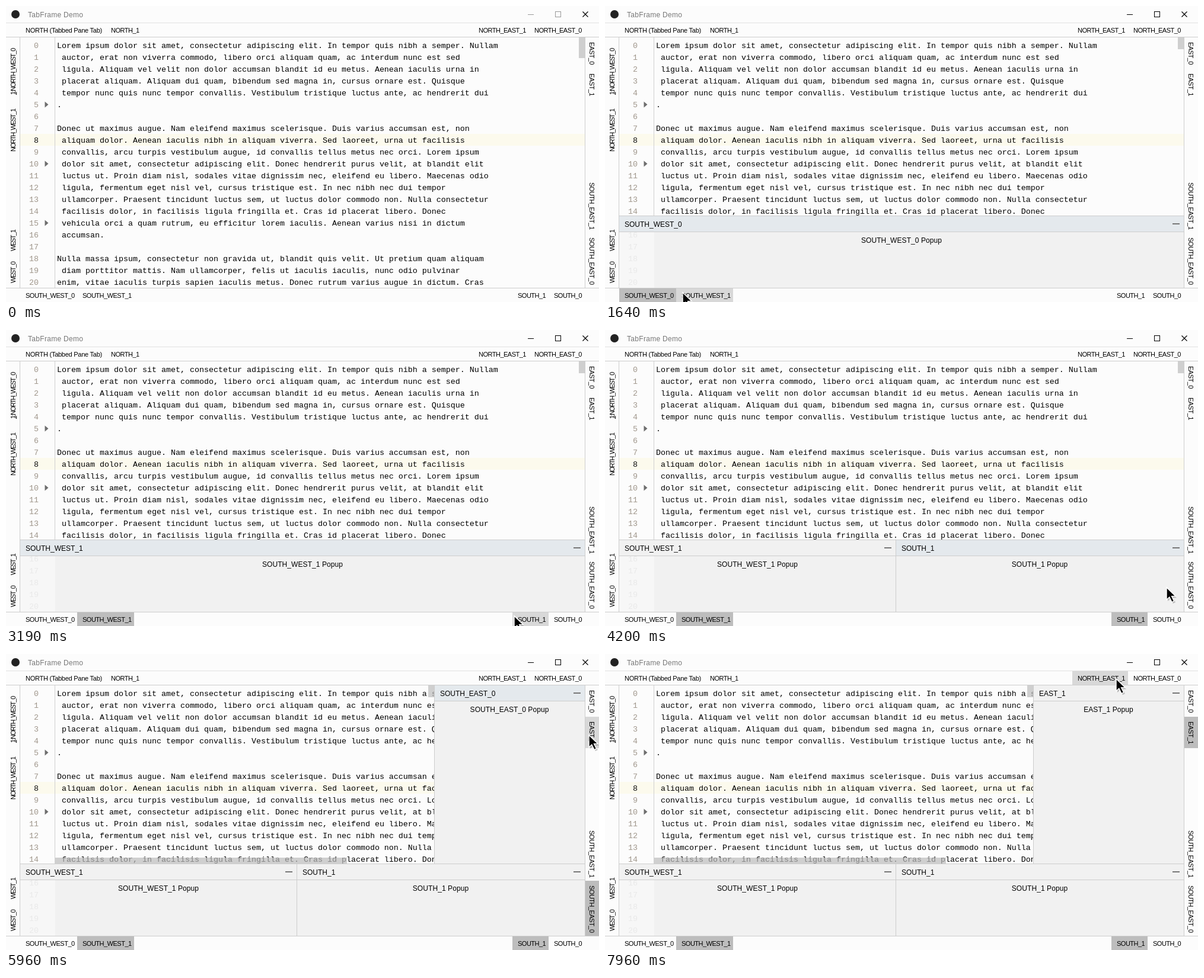
These frames come from a looping animation (1000x500 px, 7.99 s). An HTML page:

```html
<!DOCTYPE html>
<html lang="en">
<head>
<meta charset="utf-8">
<title>TabFrame Demo</title>
<style>
  html, body { margin: 0; width: 100%; height: 100%; overflow: hidden; background: #fcfcfc; }
  svg { display: block; width: 100vw; height: 100vh; }
  text { white-space: pre; font-family: "Liberation Sans", Arial, sans-serif; font-size: 12px; fill: #000; }
  .code { font-family: "Liberation Mono", "Courier New", monospace; font-size: 13.333px; }
  .num { fill: #a0978c; text-anchor: end; }
  .now { fill: #111; }
  .ghost { fill: #e9e9e9; }
  .tab { font-size: 11px; letter-spacing: -.5px; }
  .wide { letter-spacing: -.25px; }
  .tight { letter-spacing: -1.45px; }
  .title { fill: #777; letter-spacing: .3px; }
  .mid { text-anchor: middle; letter-spacing: .08px; }
</style>
</head>
<body>
<svg viewBox="0 0 1000 500" xmlns="http://www.w3.org/2000/svg">
  <g id="editor"></g>
  <g id="panels"></g>
  <g id="frame"></g>
  <g id="tabs"></g>
  <g id="cursor">
    <path d="M2 3V23l4.8-4 4.2 8 4-2-4-7.5h6z" fill="#000" opacity=".22"/>
    <path d="M0 0V20.5l4.8-4.3 4.1 8.4 3.7-1.7-4-8.3h6.4z" fill="#000" stroke="#fff" stroke-width="1.4"/>
  </g>
</svg>
<script>
const LOOP = 7990, STEP = 30;
const LINE = '#cdcdcd', HOVER = '#d8d8d8', SELECTED = '#bdbdbd';
const $ = id => document.getElementById(id);
const rect = (x, y, w, h, fill, more = '') =>
  `<rect x="${x}" y="${y}" width="${w}" height="${h}" fill="${fill}" ${more}/>`;
const text = (x, y, s, cls = '', more = '') =>
  `<text x="${x}" y="${y}" class="${cls}" ${more}>${s}</text>`;

const prose = [
  'Lorem ipsum dolor sit amet, consectetur adipiscing elit. In tempor quis nibh a semper. Nullam',
  ' auctor, erat non viverra commodo, libero orci aliquam quam, ac interdum nunc est sed',
  ' ligula. Aliquam vel velit non dolor accumsan blandit id eu metus. Aenean iaculis urna in',
  ' placerat aliquam. Aliquam dui quam, bibendum sed magna in, cursus ornare est. Quisque',
  ' tempor nunc quis nunc tempor convallis. Vestibulum tristique luctus ante, ac hendrerit dui',
  '.',
  '',
  'Donec ut maximus augue. Nam eleifend maximus scelerisque. Duis varius accumsan est, non',
  ' aliquam dolor. Aenean iaculis nibh in aliquam viverra. Sed laoreet, urna ut facilisis',
  ' convallis, arcu turpis vestibulum augue, id convallis tellus metus nec orci. Lorem ipsum',
  ' dolor sit amet, consectetur adipiscing elit. Donec hendrerit purus velit, at blandit elit',
  ' luctus ut. Proin diam nisl, sodales vitae dignissim nec, eleifend eu libero. Maecenas odio',
  ' ligula, fermentum eget nisl vel, cursus tristique est. In nec nibh nec dui tempor',
  ' ullamcorper. Praesent tincidunt luctus sem, ut luctus dolor commodo non. Nulla consectetur',
  ' facilisis dolor, in facilisis ligula fringilla et. Cras id placerat libero. Donec',
  ' vehicula orci a quam rutrum, eu efficitur lorem iaculis. Aenean varius nisi in dictum',
  ' accumsan.',
  '',
  'Nulla massa ipsum, consectetur non gravida ut, blandit quis velit. Ut pretium quam aliquam',
  ' diam porttitor mattis. Nam ullamcorper, felis ut iaculis iaculis, nunc odio pulvinar',
  'enim, vitae iaculis turpis sapien iaculis metus. Donec rutrum varius augue in dictum. Cras'
];
const lineNumber = (i, cls) => text(55, 71 + 20 * i, i, 'code num ' + cls);

$('editor').innerHTML = rect(24, 53, 952, 423, '#fcfcfc') + rect(24, 216, 952, 20, '#fcfaed') +
  rect(82, 53, 1, 423, '#d0d0d0') +
  prose.map((s, i) => lineNumber(i, i === 8 ? 'now' : '') + text(86, 71 + 20 * i, s, 'code')).join('') +
  [5, 10, 15].map(i => `<path d="M65.5 ${61.5 + 20 * i}l6 5-6 5z" fill="#6e6e6e"/>`).join('');

// name, x, y, w, h, text offset, side, style
const tabs = [
  ['NORTH (Tabbed Pane Tab)', 24, 29, 144, 23, 9, 0, 'wide'],
  ['NORTH_1', 168, 29, 65, 23, 9, 0],
  ['NORTH_EAST_1', 788, 29, 94, 23, 9, 0],
  ['NORTH_EAST_0', 882, 29, 94, 23, 9, 0],
  ['SOUTH_WEST_0', 24, 477, 96, 23, 9, 0],
  ['SOUTH_WEST_1', 120, 477, 96, 23, 9, 0],
  ['SOUTH_1', 854, 477, 61, 23, 9, 0],
  ['SOUTH_0', 915, 477, 61, 23, 9, 0],
  ['EAST_0', 977, 53, 23, 53, 8, 90],
  ['EAST_1', 977, 106, 23, 53, 8, 90],
  ['SOUTH_EAST_1', 977, 290, 23, 93, 8, 90],
  ['SOUTH_EAST_0', 977, 383, 23, 93, 8, 90],
  ['<tspan text-decoration="underline">1</tspan>:NORTH_WEST_0', 0, 62, 23, 97, 9, -90, 'tight'],
  ['NORTH_WEST_1', 0, 167, 23, 88, 9, -90, 'tight'],
  ['WEST_1', 0, 370, 23, 53, 9, -90, 'tight'],
  ['WEST_0', 0, 423, 23, 54, 9, -90, 'tight']
];

function drawTab([name, x, y, w, h, pad, side, style = ''], fill) {
  const [tx, ty] = side === 0 ? [x + pad, y + 16]
    : side > 0 ? [x + 7, y + pad] : [x + 16, y + h - pad];
  return (fill ? rect(x, y, w, h, fill) : '') +
    text(0, 0, name, 'tab ' + style, `transform="translate(${tx} ${ty}) rotate(${side})"`);
}

function drawFrame(active) {
  const ink = active ? '#000' : '#999';
  return rect(0, 0, 1000, 53, '#fcfcfc') + rect(0, 477, 1000, 23, '#fcfcfc') +
    rect(0, 53, 23, 424, '#fcfcfc') + rect(977, 53, 23, 424, '#fcfcfc') +
    rect(0, 28, 1000, 1, '#e2e2e2') + rect(0, 52, 1000, 1, LINE) + rect(0, 476, 1000, 1, LINE) +
    rect(23, 53, 1, 423, LINE) + rect(976, 53, 1, 423, LINE) +
    '<circle cx="16" cy="14" r="7" fill="#222"/>' + text(37, 19, 'TabFrame Demo', 'title') +
    rect(880, 14, 10, 1, ink) + rect(926.5, 9.5, 9, 9, 'none', `stroke="${ink}"`) +
    '<path d="M972.5 9.5l9 9m0-9l-9 9" stroke="#000" stroke-width="1.2"/>';
}

function drawPanel([name, x, y, right, bottom, focused], buttonHover) {
  const w = right - x, icon = right - 13;
  return rect(x, y, w, bottom - y, '#f1f1f1') +
    rect(x, y, w, 27, focused ? '#e4e9ed' : '#f1f1f1') +
    rect(x, y, w, 1, LINE) + rect(x, y + 27, w, 1, LINE) +
    (x > 24 ? rect(x, y, 1, bottom - y, LINE) : '') +
    (x === 24 ? rect(24, 382, 59, 94, '#f7f7f7') +
      [16, 17, 18, 19, 20].map(i => lineNumber(i, 'ghost')).join('') : '') +
    (buttonHover ? rect(icon - 12, y + 2, 24, 24, HOVER, 'rx="3"') : '') +
    rect(icon - 6, y + 13, 12, 2, '#777') +
    text(x === 24 ? 33 : x + 10, y + 19, name) +
    text((x + right) / 2, y + 46, name + ' Popup', 'mid');
}

const fullSouth = name => [name, 24, 354, 976, 476, true];
const southWest = ['SOUTH_WEST_1', 24, 354, 490, 476];
const south = focused => ['SOUTH_1', 490, 354, 976, 476, focused];
const east = (name, top, bottom, focused) => [name, 722, top, 976, bottom, focused];
const scenes = [
  [0, []],
  [1170, [fullSouth('SOUTH_WEST_0')]],
  [2100, [fullSouth('SOUTH_WEST_1')]],
  [3580, [southWest, south(true)]],
  [4830, [southWest, south(), east('SOUTH_EAST_0', 52, 354, true)]],
  [6190, [southWest, south(), east('EAST_1', 52, 191), east('SOUTH_EAST_0', 191, 354, true)]],
  [7400, [southWest, south(), east('EAST_1', 52, 354)]]
];

function drawScrollbars(panels) {
  const edge = panels.length > 2 ? 722 : 976;
  const thumb = (x, y, w, h) => rect(x, y, w, h, '#bcbcbc', 'opacity=".7"');
  return thumb(edge - 10, 53, 10, panels.length ? 20 : 35) +
    (edge === 722 ? thumb(83, 344, 492, 10) : '');
}

// Each move is a run of [time, x, y]; the pointer rests in between.
const moves = [
  [[200, 430, 438], [320, 405, 468], [440, 340, 479], [640, 190, 484], [900, 103, 483]],
  [[1400, 103, 483], [1600, 128, 484], [1840, 143, 483]],
  [[2330, 143, 483], [2360, 190, 478], [2480, 439, 463], [2690, 720, 470], [2900, 825, 480], [3090, 849, 483]],
  [[3160, 853, 483], [3220, 860, 483]],
  [[3840, 860, 483], [4020, 900, 462], [4200, 947, 435], [4350, 977, 423], [4500, 989, 419]],
  [[5090, 989, 418]],
  [[5390, 989, 418], [5510, 990, 360], [5750, 987, 200], [5960, 983, 137]],
  [[6550, 983, 137], [6750, 972, 175], [6970, 963, 201]],
  [[7630, 963, 201], [7780, 905, 105], [7870, 873, 55], [7960, 862, 42]]
];

function pointerAt(t) {
  const move = moves.filter(m => m[0][0] <= t).pop();
  if (!move) return [-50, -50];
  const start = move[0][0];
  const time = start + Math.floor((t - start) / STEP) * STEP;
  const next = move.findIndex(p => p[0] > time);
  if (next < 0) return move[move.length - 1].slice(1);
  const [t0, x0, y0] = move[next - 1], [t1, x1, y1] = move[next];
  const k = (time - t0) / (t1 - t0);
  return [Math.round(x0 + (x1 - x0) * k), Math.round(y0 + (y1 - y0) * k)];
}

const inside = (px, py, x, y, w, h) => px >= x && px < x + w && py >= y && py < y + h;
const shown = {};
function put(id, markup) {
  if (shown[id] !== markup) $(id).innerHTML = shown[id] = markup;
}

function render(t) {
  const [px, py] = pointerAt(t);
  const panels = scenes.filter(s => s[0] <= t).pop()[1];
  const open = panels.map(p => p[0]);
  put('panels', drawScrollbars(panels) +
    panels.map(p => drawPanel(p, inside(px, py, p[3] - 25, p[2] + 1, 24, 26))).join(''));
  put('frame', drawFrame(t >= 1070));
  put('tabs', tabs.map(tab => drawTab(tab,
    open.includes(tab[0]) ? SELECTED : inside(px, py, ...tab.slice(1, 5)) ? HOVER : '')).join(''));
  $('cursor').setAttribute('transform', `translate(${px} ${py})`);
}

function tick() {
  render(performance.now() % LOOP);
  requestAnimationFrame(tick);
}
tick();
</script>
</body>
</html>
```
